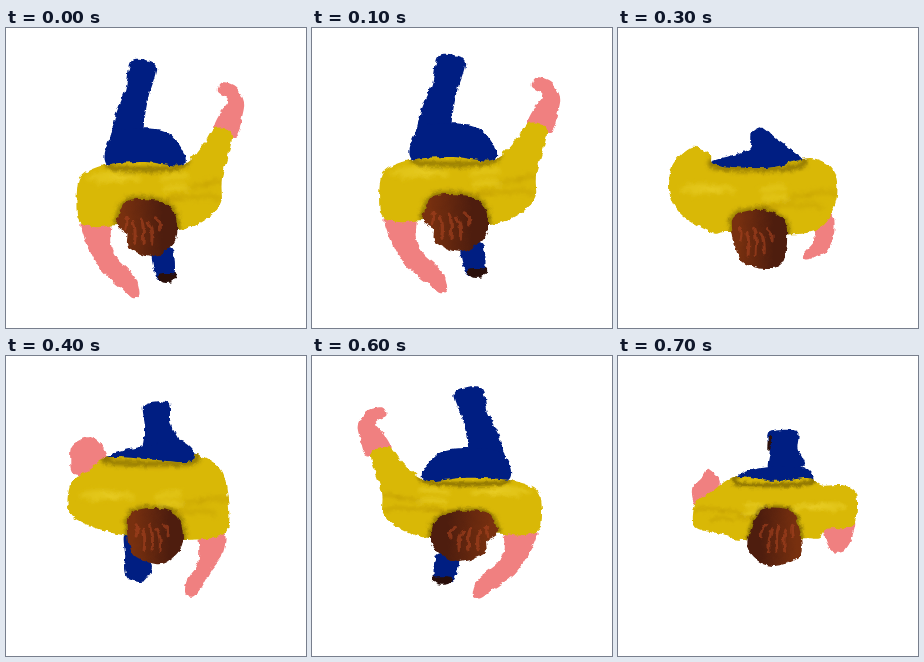
Write an HTML page that moves like this. It is 300x300 px and loops after 800 ms.

```html
<!DOCTYPE html>
<html>
<head>
<meta charset="utf-8">
<title>Walk from above</title>
<style>
html, body { margin: 0; width: 100%; height: 100%; overflow: hidden; background: #fff; }
svg { display: block; width: 100vw; height: 100vh; }
.pose { visibility: hidden; animation: show 800ms step-end infinite; }
@keyframes show {
  0% { visibility: visible; }
  12.5%, 100% { visibility: hidden; }
}
.leg { fill: #001e82; }
.skin { fill: #f08080; }
.shoe { fill: #2a0f0a; }
.shirt { fill: #d9b806; }
.hair { fill: url(#brown); }
.line { fill: none; stroke-linecap: round; }
.light { stroke: #ecd22c; stroke-width: 6; opacity: .5; }
.dark { stroke: #bd9a00; stroke-width: 5; opacity: .4; }
.shade { stroke: #6b5508; stroke-width: 5; opacity: .7; }
.red { stroke: #a8431f; stroke-width: 3; opacity: .6; }
</style>
</head>
<body>
<svg id="stage" viewBox="0 0 300 300">
  <defs>
    <linearGradient id="brown">
      <stop offset=".1" stop-color="#78300f"/>
      <stop offset=".75" stop-color="#4e1d0e"/>
    </linearGradient>
    <filter id="soft" x="0" y="0" width="300" height="300" filterUnits="userSpaceOnUse"><feGaussianBlur stdDeviation="2"/></filter>
    <filter id="rough" x="0" y="0" width="300" height="300" filterUnits="userSpaceOnUse" color-interpolation-filters="sRGB">
      <feTurbulence type="fractalNoise" baseFrequency=".16" numOctaves="2" seed="4"/>
      <feDisplacementMap in="SourceGraphic" scale="5" xChannelSelector="R" yChannelSelector="G"/>
    </filter>
  </defs>
</svg>
<script>
// Limbs are "x,y,radius" along the bone; the rest are outlines of "x,y".
const reach = {
  legs: ['138,35,12 131,65,12 123,95,15 120,138,17', '156,222,10 160,250,8'],
  shoes: ['161,246,9 161,254,5'],
  arms: ['219,105,11 225,88,11 230,74,8 225,64,7 214,59,5', '90,192,14 94,218,11 104,237,10 122,254,9 130,268,4'],
  hip: '103,138 109,105 150,101 170,112 176,138',
  shirt: '104,136 140,134 176,137 197,117 209,100 226,107 216,150 215,175 200,191 172,202 117,197 88,199 72,190 72,155 82,143',
  hair: '121,173 152,173 168,184 170,211 148,229 122,219 120,205 111,196'
};
const pass = {
  legs: ['132,73,15 131,92,15 128,112,18'],
  shoes: ['146,79,1.5 147,92,1.5'],
  arms: ['213,114,2 210,124,10 216,138,14 219,152,8', '72,168,16 72,185,15 73,196,11 73,203,5'],
  hip: '103,128 111,111 155,112 182,121 176,130',
  shirt: '53,140 66,131 90,131 104,123 140,126 182,121 210,139 226,150 226,176 195,184 176,190 112,188 92,188 85,178 56,174',
  hair: '121,160 138,155 157,159 170,192 163,209 142,218 114,208 113,183'
};
const cross = {
  legs: [],
  shoes: [],
  arms: ['204,186,10 206,205,10 202,219,8 187,229,3'],
  hip: '93,134 115,127 132,120 134,105 145,100 158,111 186,132 170,140 105,140',
  shirt: '54,138 74,119 92,127 98,137 150,140 192,130 215,142 219,168 207,196 180,206 110,204 95,205 65,188 52,168',
  hair: '114,192 130,183 150,183 168,196 166,232 148,241 122,231'
};
const swing = {
  legs: ['150,48,12 152,70,13 158,104,20', '124,178,6 128,198,9 132,212,14 130,224,8'],
  shoes: [],
  arms: ['76,85,10 82,100,18 82,118,14', '206,176,12 205,195,12 198,212,7 188,228,8 183,239,4'],
  hip: '104,106 107,98 138,90 175,85 187,106',
  shirt: '105,101 180,106 190,98 214,112 221,135 220,176 178,184 116,179 66,160 65,127 85,113',
  hair: '125,157 148,152 172,160 176,190 155,208 128,199 122,176'
};

// The second step mirrors the first, a little flatter: x scale, y scale, x shift, y shift.
const steps = [
  [reach, 1, 1, 0, 0],
  [reach, 1.08, 1, -9, -5],
  [pass, 1, 1, 0, 0],
  [cross, 1, 1, 0, 0],
  [swing, 1, 1, 0, 0],
  [reach, -1, .85, 298, 4],
  [reach, -1.1, .886, 307.6, 3],
  [pass, -.93, .925, 287.5, 8.3]
];

const parse = s => s.split(' ').map(p => p.split(',').map(Number));

// Smooth closed curve through the points
function curve(p) {
  const n = p.length, k = .15, at = i => p[(i + n) % n];
  let d = 'M' + p[0];
  for (let i = 0; i < n; i++) {
    const [a, b, c, e] = [at(i - 1), at(i), at(i + 1), at(i + 2)];
    d += `C${b.map((v, j) => v + (c[j] - a[j]) * k)} ${c.map((v, j) => v - (e[j] - b[j]) * k)} ${c}`;
  }
  return d + 'Z';
}

// Outline at each radius on both sides of the bone
function limb(s) {
  const p = parse(s), n = p.length;
  const side = sign => p.map(([x, y, r], i) => {
    const a = p[Math.max(0, i - 1)], b = p[Math.min(n - 1, i + 1)];
    const dx = b[0] - a[0], dy = b[1] - a[1], k = sign * r / Math.hypot(dx, dy);
    return [x - dy * k, y + dx * k];
  });
  return curve([...side(1), ...side(-1).reverse()]);
}

function random(seed) {
  return () => (seed = seed * 16807 % 2147483647) / 2147483647;
}

function box(p) {
  const [xs, ys] = [0, 1].map(j => p.map(q => q[j]));
  const x = Math.min(...xs), y = Math.min(...ys);
  return { x, y, w: Math.max(...xs) - x, h: Math.max(...ys) - y };
}

const path = (cls, d) => `<path class="${cls}" d="${d}"/>`;

// Loose brush strokes along the cloth
function folds(p) {
  const { x, y, w, h } = box(p), rnd = random(71);
  return Array.from({ length: 10 }, (_, i) => {
    const fx = x + w * (.08 + .75 * rnd()), fy = y + h * (.3 + .55 * rnd());
    return path('line ' + (i % 2 ? 'dark' : 'light'), `M${fx} ${fy}q12 -5 ${18 + 14 * rnd()} ${6 * rnd() - 5}`);
  }).join('');
}

// Reddish locks, longest in the middle
function locks(p) {
  const { x, y, w, h } = box(p);
  return Array.from({ length: 5 }, (_, i) => {
    const f = i / 4, len = h * (.2 + .25 * Math.sin(Math.PI * f));
    return path('line red', `M${x + w * (.15 + .5 * f)} ${y + h * (.3 + .08 * (i % 2))}q${2 + 4 * f} ${len / 3} ${5 * f} ${len}`);
  }).join('');
}

function pose([p, sx, sy, tx, ty], i) {
  const shirt = parse(p.shirt), hair = parse(p.hair);
  const [body, head, hip] = [shirt, hair, parse(p.hip)].map(curve);
  const limbs = (cls, list) => list.map(s => path(cls, limb(s))).join('');
  return `<g class="pose" style="animation-delay:${(i - 8) * 100}ms">
    <g transform="matrix(${sx} 0 0 ${sy} ${tx} ${ty})" filter="url(#rough)">
      <clipPath id="body${i}"><path d="${body}"/></clipPath>
      ${limbs('leg', p.legs) + path('leg', hip) + limbs('shoe', p.shoes) + limbs('skin', p.arms) + path('shirt', body)}
      <g clip-path="url(#body${i})"><g filter="url(#soft)">
        ${folds(shirt) + path('line shade', hip) + path('line shade', head)}
      </g></g>
      ${path('hair', head) + locks(hair)}
    </g></g>`;
}

document.getElementById('stage').insertAdjacentHTML('beforeend', steps.map(pose).join(''));
</script>
</body>
</html>
```
